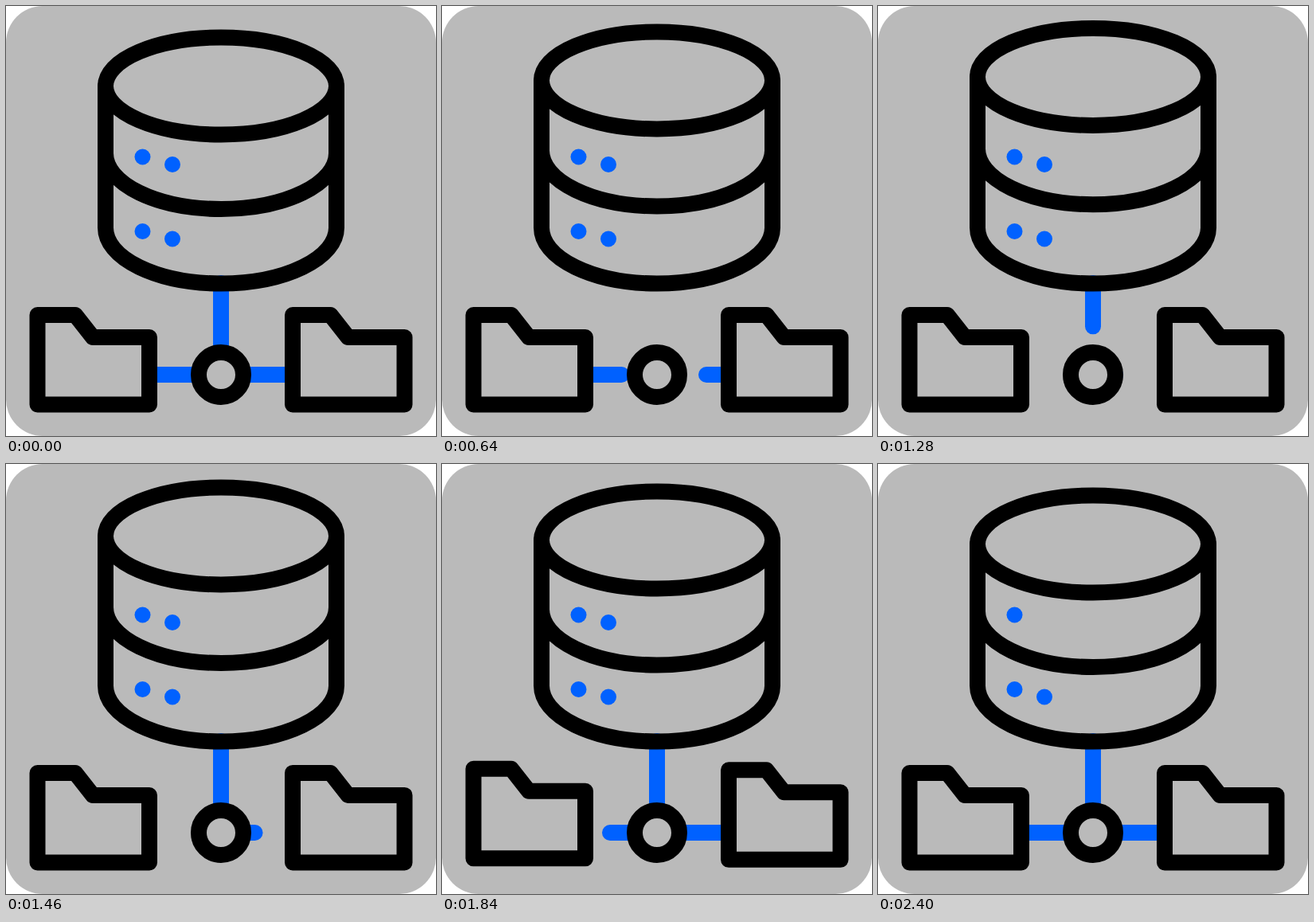
Write an HTML page that moves like this. It is 540 by 540 pixels and loops after 2.42 s.

```html
<!DOCTYPE html>
<html lang="en">
<head>
<meta charset="utf-8">
<title>Database sync</title>
<style>
  html, body { margin: 0; width: 100%; height: 100%; overflow: hidden; background: #fff; }
  svg { display: block; width: 100vw; height: 100vh; }
  .ink { fill: none; stroke: #000; stroke-width: 20; stroke-linejoin: round; stroke-linecap: round; }
  .wire { stroke: #0061ff; stroke-width: 20; stroke-linecap: round; }
  .dot { fill: #0061ff; }
</style>
</head>
<body>
<svg viewBox="0 0 540 540">
  <defs>
    <path id="folder" d="M39.5 388H87L109 416H180V500.500H39.500Z"/>
  </defs>
  <rect width="540" height="540" rx="46" fill="#bababa"/>
  <line class="wire" id="down"/>
  <line class="wire" id="right"/>
  <line class="wire" id="left"/>
  <g class="ink">
    <path id="body"/>
    <ellipse id="lid" cx="270" rx="145" ry="61"/>
    <path id="ring" d="M125 185A145 70 0 0 0 415 185"/>
    <circle cx="270" cy="463" r="28"/>
    <use id="leftFolder" href="#folder"/>
    <use id="rightFolder" href="#folder" x="320.500"/>
  </g>
  <g class="dot">
    <circle cx="171.500" cy="189.500" r="10"/>
    <circle id="blink" cx="209" cy="199" r="10"/>
    <circle cx="171.500" cy="283" r="10"/>
    <circle cx="209" cy="292.500" r="10"/>
  </g>
</svg>
<script>
  const LOOP = 2420, STEP = 20;
  const $ = id => document.getElementById(id);

  // Each wire runs from -> to; it drains over [out], then refills over [in].
  const wires = [
    { el: $('down'),  axis: 'y', from: 348, to: 434, out: [0, 620],    in: [915, 1535] },
    { el: $('right'), axis: 'x', from: 298, to: 360, out: [310, 930],  in: [1265, 1885] },
    { el: $('left'),  axis: 'x', from: 242, to: 180, out: [430, 1050], in: [1540, 2140] }
  ];

  const folders = [
    { el: $('rightFolder'), keys: [1440, 1720, 2000] },
    { el: $('leftFolder'),  keys: [1625, 1905, 2185] }
  ];

  function ease(t, a, b) {
    const p = Math.min(1, Math.max(0, (t - a) / (b - a)));
    return p * p * (3 - 2 * p);
  }

  const bump = (t, [a, peak, b]) => ease(t, a, peak) - ease(t, peak, b);

  function set(el, attrs) {
    for (const k in attrs) el.setAttribute(k, attrs[k]);
  }

  for (const w of wires) {
    const cross = w.axis === 'x' ? 'y' : 'x';
    const pos = w.axis === 'x' ? 463 : 270;
    set(w.el, { [cross + 1]: pos, [cross + 2]: pos });
  }

  function drawWire(w, t) {
    const filling = t >= w.in[0];
    const p = ease(t, ...(filling ? w.in : w.out));
    const at = w.from + (w.to - w.from) * p;
    set(w.el, {
      [w.axis + 1]: filling ? w.from : at,
      [w.axis + 2]: filling ? at : w.to,
      visibility: (filling ? p > 0 : p < 1) ? 'visible' : 'hidden'
    });
  }

  function draw(t) {
    const lift = 12 * bump(t, [0, 1140, 2400]);
    const top = 100.5 - lift;
    set($('lid'), { cy: top });
    set($('body'), { d: `M125 ${top}V278.500A145 70 0 0 0 415 278.500V${top}` });
    set($('ring'), { transform: `translate(0 ${-lift / 2})` });
    wires.forEach(w => drawWire(w, t));
    folders.forEach(f => set(f.el, { transform: `translate(0 ${-6 * bump(t, f.keys)})` }));
    set($('blink'), { visibility: t < 2400 ? 'visible' : 'hidden' });
  }

  const start = performance.now();
  function tick() {
    const t = (performance.now() - start) % LOOP;
    draw(Math.floor(t / STEP) * STEP);
    requestAnimationFrame(tick);
  }
  draw(0);
  requestAnimationFrame(tick);
</script>
</body>
</html>
```
